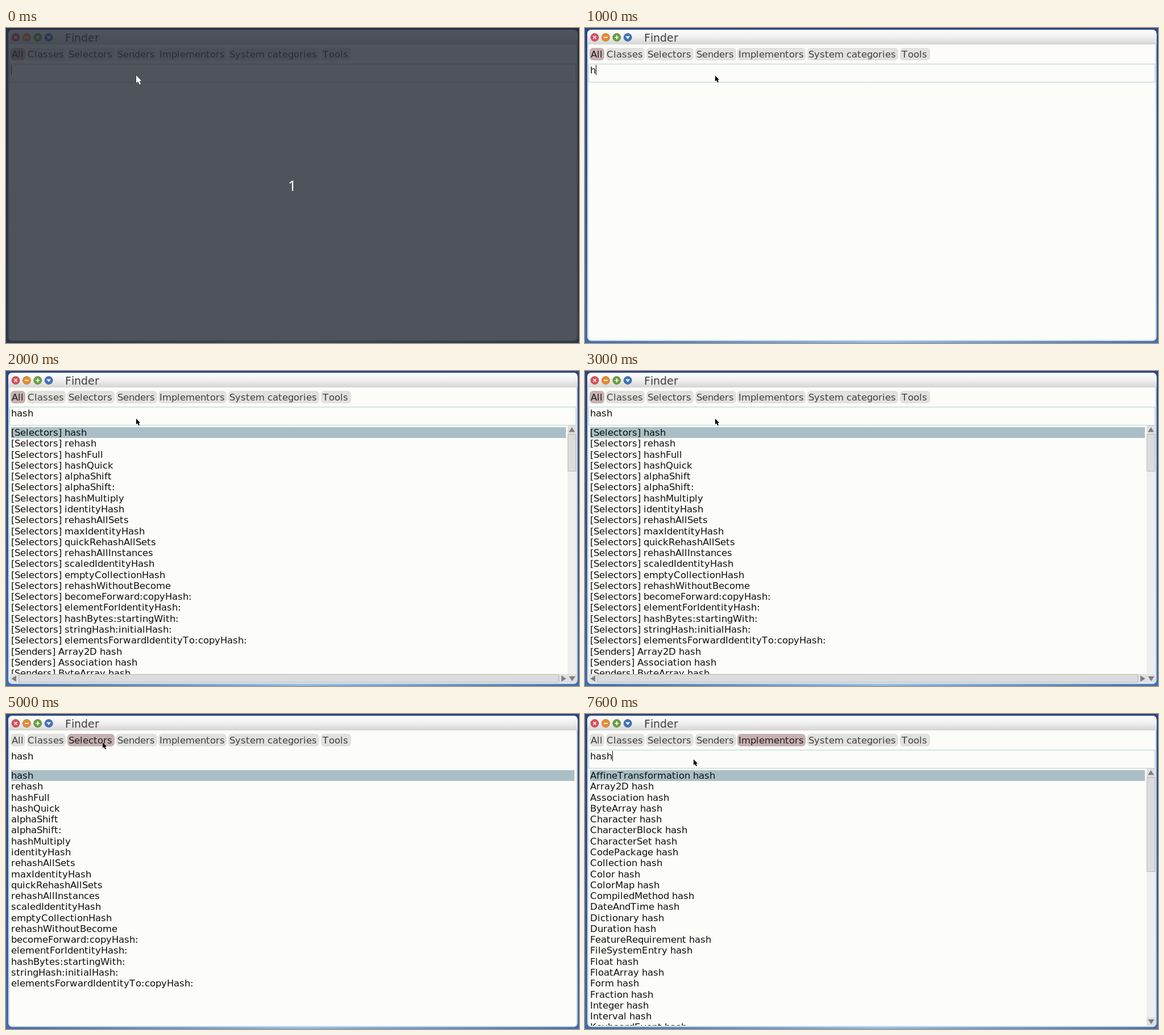
These frames come from a looping animation (1008x555 px, 8000 ms). An HTML page with a canvas:

```html
<!DOCTYPE html>
<html lang="en">
<head>
<meta charset="utf-8">
<title>Finder</title>
<style>
html, body { margin: 0; width: 100%; height: 100%; overflow: hidden; }
canvas { display: block; }
</style>
</head>
<body>
<canvas id="stage" width="1008" height="555"></canvas>
<script>
const ctx = document.getElementById('stage').getContext('2d');
const LOOP = 8000, SIZE = 16.5, ROW = 19.28;
const PAPER = '#fcfdf8', PINK = '#c7b1b1', GRAY = '#e1e1dd';

const words = s => s.trim().split(/\s+/);
const tag = (label, items) => items.map(s => `[${label}] ${s}`);

const hasList = [
  ...tag('Classes', words('TextEmphasis ShoutTextEmphasis')),
  ...tag('Selectors', words(`hash phase rehash hasIcon hasMask emphasis hasModel hasTitle
    hashFull emphasis: hasErrors hasMarker hasOwner: hasPassed hasSaveAs hasTablet hasToggle
    hashQuick nowHasDef nowHasRef alphaShift`))
];
const selectors = words(`hash rehash hashFull hashQuick alphaShift alphaShift: hashMultiply
  identityHash rehashAllSets maxIdentityHash quickRehashAllSets rehashAllInstances
  scaledIdentityHash emptyCollectionHash rehashWithoutBecome becomeForward:copyHash:
  elementForIdentityHash: hashBytes:startingWith: stringHash:initialHash:
  elementsForwardIdentityTo:copyHash:`);
const hashList = [
  ...tag('Selectors', selectors),
  ...tag('Senders', ['Array2D hash', 'Association hash', 'ByteArray hash'])
];
const implementors = words(`AffineTransformation Array2D Association ByteArray Character
  CharacterBlock CharacterSet CodePackage Collection Color ColorMap CompiledMethod DateAndTime
  Dictionary Duration FeatureRequirement FileSystemEntry Float FloatArray Form Fraction
  Integer Interval KeyboardEvent`).map(s => s + ' hash');

const tabs = [
  ['All', 8, 26], ['Classes', 37, 68], ['Selectors', 108, 83], ['Senders', 194, 72],
  ['Implementors', 268, 120], ['System categories', 391, 160], ['Tools', 554, 53]
];

// Timelines hold [time, value]; each value stays until the next one.
const query = [[0, ''], [1000, 'h'], [1100, 'ha'], [1200, 'has'], [1400, 'hash']];
const caret = [[0, true], [600, false], [1000, true], [2000, false], [2500, true],
  [3000, false], [3600, true]];
const chosenTab = [[0, 'All'], [4500, 'Selectors'], [5600, 'Implementors']];
const results = [
  [0, null],
  [1200, { rows: hasList, right: 988, thumb: 167, across: 497 }],
  [1400, { rows: hashList, right: 985, thumb: 177, across: 973 }],
  [4500, { rows: selectors, right: 1000 }],
  [5600, { rows: implementors, right: 985, thumb: 278 }]
];
const pointer = [
  [0, [229, 84]],
  [3900, [222, 82]], [4000, [203, 70]], [4100, [172, 55]], [4200, [157, 51]],
  [4800, [161, 51]], [5000, [170, 50]], [5100, [195, 48]], [5200, [234, 46]],
  [5300, [276, 45]], [5400, [310, 45]], [5500, [325, 45]],
  [7000, [322, 52]], [7100, [310, 68]], [7200, [284, 82]], [7300, [250, 88]],
  [7400, [220, 86]], [7500, [200, 82]], [7600, [191, 80]]
];
const at = (line, t) => line.filter(e => e[0] <= t).pop()[1];

function box(x, y, w, h, fill, stroke) {
  ctx.fillStyle = fill;
  ctx.fillRect(x, y, w, h);
  if (stroke) {
    ctx.strokeStyle = stroke;
    ctx.lineWidth = 1;
    ctx.strokeRect(x + .5, y + .5, w - 1, h - 1);
  }
}

function round(x, y, w, h, r, fill) {
  ctx.fillStyle = fill;
  ctx.beginPath();
  ctx.roundRect(x, y, w, h, r);
  ctx.fill();
}

function poly(points, fill, x = 0, y = 0, scale = 1) {
  ctx.beginPath();
  points.forEach(([px, py]) => ctx.lineTo(x + px * scale, y + py * scale));
  ctx.closePath();
  ctx.fillStyle = fill;
  ctx.fill();
}

function fade(x0, y0, x1, y1, ...colors) {
  const g = ctx.createLinearGradient(x0, y0, x1, y1);
  colors.forEach((c, i) => g.addColorStop(i / (colors.length - 1), c));
  return g;
}

// Glyphs advance by whole pixels, as in a bitmap font.
const cache = {};
function advance(ch, size) {
  const key = ch + size;
  if (!(key in cache)) {
    ctx.save();
    ctx.font = `${size * 100}px "DejaVu Sans", sans-serif`;
    const width = ctx.measureText(ch).width / 100;
    ctx.restore();
    cache[key] = Math.round(width) + (size === SIZE && 'twET'.includes(ch) ? 1 : 0);
  }
  return cache[key];
}
const textWidth = s => [...s].reduce((sum, ch) => sum + advance(ch, SIZE), 0);

function text(s, x, y, color = '#101010', size = SIZE) {
  ctx.font = `${size}px "DejaVu Sans", sans-serif`;
  ctx.fillStyle = color;
  for (const ch of s) {
    ctx.fillText(ch, x, y);
    x += advance(ch, size);
  }
  return x;
}

function drawDesktop() {
  box(0, 0, 1008, 555, fade(0, 0, 0, 555, '#27468a', '#2f5798', '#3c6cb4'));
  const glow = ctx.createRadialGradient(520, 555, 0, 520, 555, 500);
  glow.addColorStop(0, '#86bdf0');
  glow.addColorStop(1, '#86bdf000');
  box(0, 549, 1008, 6, glow);
}

function drawWindow() {
  round(4, 3, 1001.5, 548.5, 7, '#d3e0e8');
  round(6.5, 5, 996.5, 544.5, 4, PAPER);
  round(4, 3, 1001.5, 26, [7, 7, 0, 0], fade(0, 3, 0, 29, '#ffffff', '#efefef', '#d5d5d5'));
  ['#d94f5c', '#e58c2c', '#68a03e', '#3f71b9'].forEach((color, i) => {
    const x = 17 + i * 19.4, y = 16.5;
    const g = fade(0, y - 7, 0, y + 7, color, color);
    g.addColorStop(.15, color);
    ctx.beginPath();
    ctx.arc(x, y, 7.2, 0, 7);
    ctx.fillStyle = g;
    ctx.fill();
    ctx.strokeStyle = '#0003';
    ctx.lineWidth = 1;
    ctx.stroke();
    ctx.strokeStyle = '#fff';
    ctx.lineWidth = 1.7;
    ctx.beginPath();
    if (i === 0) {
      ctx.moveTo(x - 2.5, y - 2.5); ctx.lineTo(x + 2.5, y + 2.5);
      ctx.moveTo(x + 2.5, y - 2.5); ctx.lineTo(x - 2.5, y + 2.5);
    } else if (i < 3) {
      ctx.moveTo(x - 3.5, y); ctx.lineTo(x + 3.5, y);
      if (i === 2) { ctx.moveTo(x, y - 3.5); ctx.lineTo(x, y + 3.5); }
    }
    ctx.stroke();
    if (i === 3) poly([[-4, -2], [4, -2], [0, 3]], '#fff', x, y);
  });
  text('Finder', 104, 24, '#404040', 19);
}

function drawTabs(t, [px, py]) {
  for (const [name, x, w] of tabs) {
    const hover = px >= x && px < x + w && py >= 35 && py < 57;
    const chosen = at(chosenTab, t) === name;
    round(x, 35, w, 22, 6, hover || chosen ? PINK : GRAY);
    text(name, x + Math.floor((w - textWidth(name) - 1) / 2), 52, chosen ? '#202020' : '#404040');
  }
}

function drawField(t, focused) {
  if (focused) {
    ctx.strokeStyle = '#b4d0dc';
    ctx.lineWidth = 1;
    ctx.strokeRect(6.5, 63.5, 996, 32);
  }
  const end = text(at(query, t), 9, 80);
  if (focused && at(caret, t)) box(end, 65, 1, 18, '#101010');
}

function arrow(x, y, turn) {
  ctx.save();
  ctx.translate(x, y);
  ctx.rotate(turn * Math.PI / 2);
  poly([[0, -4.5], [5.5, 4], [-5.5, 4]], '#7d7d7d');
  ctx.restore();
}

function drawScrollbars(thumb, across) {
  const edge = '#b9b9b9', face = '#dcdcdc';
  if (thumb) {
    box(988, 96, 15, 453, '#eeeeee');
    box(988, 96, 15, 15, '#e0e0e0');
    box(988, 534, 15, 15, '#e0e0e0');
    box(988, 111, 15, thumb - 111, face, edge);
    arrow(995.5, 103.5, 0);
    arrow(996, 542, 2);
  }
  if (across) {
    box(7, 534, 981, 15, '#eeeeee');
    box(7, 534, 15, 15, '#e0e0e0');
    box(973, 534, 15, 15, '#e0e0e0');
    box(22, 534, across - 22, 15, face, edge);
    arrow(14, 542, 3);
    arrow(981, 542, 1);
  }
}

function drawResults(found) {
  if (!found) return;
  const { rows, right, thumb, across } = found;
  ctx.save();
  ctx.beginPath();
  ctx.rect(7, 97, 996, (across ? 534 : 549) - 97);
  ctx.clip();
  box(9, 99, right - 9, 19, '#a9bfc5');
  rows.forEach((s, i) => text(s, 9, Math.round(114 + i * ROW)));
  ctx.restore();
  drawScrollbars(thumb, across);
}

const arrowShape = [[0, 0], [0, 10], [2.3, 8], [4.3, 12], [6, 11.2], [4.2, 7.4], [7, 7.2]];
function drawPointer(x, y, fill, line, scale) {
  ctx.lineJoin = 'round';
  poly(arrowShape, fill, x, y, scale);
  ctx.strokeStyle = line;
  ctx.lineWidth = 1;
  ctx.stroke();
  poly(arrowShape, fill, x, y, scale);
}

function drawCountdown() {
  box(0, 0, 1008, 555, 'rgba(37, 42, 53, .8)');
  ctx.font = '26px "Noto Sans", sans-serif';
  ctx.fillStyle = '#fff';
  ctx.textAlign = 'center';
  ctx.fillText('1', 503.5, 287);
  ctx.textAlign = 'left';
  drawPointer(229, 83.5, '#fff', '#111', 1.35);
}

function draw(t) {
  const [x, y] = at(pointer, t);
  drawDesktop();
  drawWindow();
  drawTabs(t, [x, y]);
  drawField(t, y >= 63 && y < 97);
  drawResults(at(results, t));
  if (t < 100) drawCountdown();
  else drawPointer(x, y, '#000', '#fffc', 1);
}

ctx.fontKerning = 'none';
const start = performance.now();
function tick() {
  draw((performance.now() - start) % LOOP);
  requestAnimationFrame(tick);
}
tick();
</script>
</body>
</html>
```
